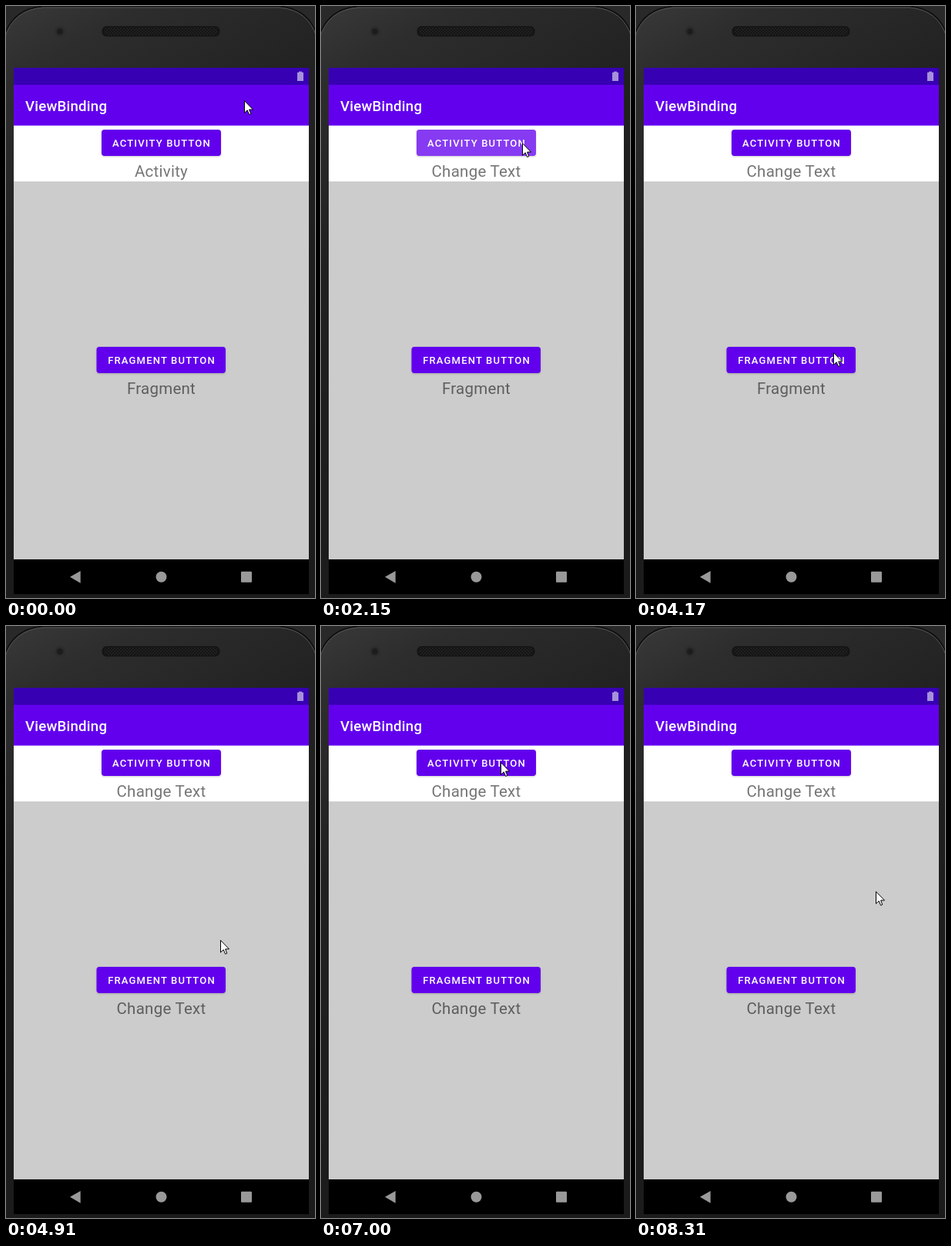
Write an HTML page that moves like this. It is 401 by 766 pixels and loops after 8.67 s.

```html
<!DOCTYPE html>
<html lang="en">
<head>
<meta charset="utf-8">
<title>ViewBinding</title>
<style>
  html, body { margin: 0; width: 100%; height: 100%; overflow: hidden; background: #161616; }
  svg { display: block; width: 401px; height: 766px; font-family: Roboto, sans-serif; }
  .title { font-size: 18.64px; font-weight: 500; letter-spacing: .0125em; fill: #fff; }
  .label { font-size: 13.05px; font-weight: 500; letter-spacing: .0893em; fill: #fff; text-anchor: middle; }
  .view { font-size: 20.5px; letter-spacing: .25px; fill: #000; fill-opacity: .54; text-anchor: middle; }
  .button { fill: #6200ee; filter: drop-shadow(0 1px 1px rgba(0, 0, 0, .2)); }
  .ripple { fill: #fff; opacity: 0; }
  .nav { fill: #999; }
</style>
</head>
<body>
<svg viewBox="0 0 401 766">
  <defs>
    <linearGradient id="body" x2=".3" y2="1">
      <stop offset="0" stop-color="#393939"/>
      <stop offset=".12" stop-color="#2d2d2d"/>
      <stop offset=".4" stop-color="#202020"/>
      <stop offset="1" stop-color="#1b1b1b"/>
    </linearGradient>
    <radialGradient id="lens">
      <stop offset=".3" stop-color="#1c1c1e"/>
      <stop offset=".6" stop-color="#2c2c2c"/>
      <stop offset="1" stop-color="#2c2c2c" stop-opacity="0"/>
    </radialGradient>
    <pattern id="mesh" width="4" height="4" patternUnits="userSpaceOnUse">
      <circle cx="1" cy="1" r=".8" fill="#303030"/>
      <circle cx="3" cy="3" r=".8" fill="#303030"/>
    </pattern>
    <clipPath id="clipA"><rect x="124" y="160" width="155" height="34" rx="3.7"/></clipPath>
    <clipPath id="clipF"><rect x="117.5" y="441" width="167.5" height="34" rx="3.7"/></clipPath>
  </defs>

  <!-- phone -->
  <rect width="401" height="60" fill="#292929"/>
  <path d="M-2 770V40Q8 4 48 .5H355Q393 4 403 38V770Z" fill="url(#body)" stroke="#101010" stroke-width="2"/>
  <path d="M-2 42Q9 5 48 2H355Q392 5 403 40" fill="none" stroke="#555"/>
  <circle cx="70" cy="33" r="9" fill="url(#lens)"/>
  <rect x="124.5" y="26" width="153" height="13.5" rx="6" fill="#141414"/>
  <rect x="127" y="27.5" width="148" height="10.5" rx="5" fill="url(#mesh)"/>

  <!-- screen -->
  <rect x="10" y="80" width="383" height="681"/>
  <rect x="10" y="80" width="383" height="22" fill="#3700b3"/>
  <path d="M380 86V84.8H384V86H386V97H378V86Z" fill="#a690dc"/>
  <rect x="10" y="154" width="383" height="73" fill="#fff"/>
  <rect x="10" y="227" width="383" height="489" fill="#ccc"/>
  <rect x="10" y="102" width="383" height="52.7" fill="#6200ee"/>
  <text class="title" x="24.9" y="135.6">ViewBinding</text>

  <rect class="button" x="124" y="160" width="155" height="34" rx="3.7"/>
  <g clip-path="url(#clipA)"><circle class="ripple" id="rippleA"/></g>
  <text class="label" x="202" y="182">ACTIVITY BUTTON</text>
  <text class="view" id="textA" x="201.5" y="221">Activity</text>

  <rect class="button" x="117.5" y="441" width="167.5" height="34" rx="3.7"/>
  <g clip-path="url(#clipF)"><circle class="ripple" id="rippleF"/></g>
  <text class="label" x="202" y="463">FRAGMENT BUTTON</text>
  <text class="view" id="textF" x="201.5" y="502">Fragment</text>

  <!-- navigation -->
  <path class="nav" d="M83 738.7L96.7 731V746.7Z"/>
  <circle class="nav" cx="201.5" cy="738.7" r="7"/>
  <rect class="nav" x="305" y="731.8" width="14" height="14" rx="1"/>

  <path id="cursor" d="M.5 .7V16.3L4.2 12.8L6.6 18.4L8.8 17.5L6.6 12H11.5Z" fill="#fff" stroke="#000" stroke-linejoin="round"/>
</svg>
<script>
const LOOP = 8670, STEP = 73.3, BOW = .06;
const $ = id => document.getElementById(id);

// Each stop: when the cursor leaves for it, when it arrives, and where it is.
const home = { x: 309, y: 122 };
const stops = [
  { leave: 70, arrive: 900, x: 304, y: 153 },
  { leave: 980, arrive: 1490, x: 261, y: 177 },
  { leave: 3150, arrive: 3670, x: 266, y: 412 },
  { leave: 3950, arrive: 4170, x: 256, y: 448 },
  { leave: 4690, arrive: 5130, x: 286, y: 379 },
  { leave: 5630, arrive: 6070, x: 276, y: 298 },
  { leave: 6780, arrive: 7150, x: 208, y: 133 },
  { leave: 7300, arrive: 8100, x: 315, y: 362 },
  { leave: 8180, arrive: 8310, x: 308, y: 337 }
];

function click(key, at, x, y, centreY) {
  const text = $('text' + key);
  return { at, x, y, centreY, text, before: text.textContent, ripple: $('ripple' + key) };
}
const clicks = [click('A', 1860, 261, 177, 177), click('F', 4390, 256, 448, 458)];

const clamp = x => Math.max(0, Math.min(1, x));
const mix = (a, b, u) => a + (b - a) * u;
const smooth = p => p * p * (3 - 2 * p);
const ticks = ms => Math.floor(ms / STEP + .1);

function cursorAt(t) {
  let from = home, pos = home;
  for (const to of stops) {
    if (t < to.leave) break;
    const count = Math.round((to.arrive - to.leave) / STEP) + 1;
    const u = smooth(clamp((ticks(t - to.leave) + 1) / count));
    const bow = BOW * Math.abs(to.y - from.y) * Math.sin(Math.PI * u);
    pos = { x: mix(from.x, to.x, u) + bow, y: mix(from.y, to.y, u) };
    from = to;
  }
  return pos;
}

function drawClick({ at, x, y, centreY, ripple, text, before }, t) {
  const age = ticks(t - at) * STEP;
  const grow = clamp((age + 40) / 225);
  const ease = 1 - (1 - grow) ** 2;
  const fade = clamp((age + 40) / 75) * clamp((500 - age) / 150);
  ripple.setAttribute('cx', mix(x, 201.5, ease));
  ripple.setAttribute('cy', mix(y, centreY, ease));
  ripple.setAttribute('r', mix(46, 90, ease));
  ripple.style.opacity = age < 0 ? 0 : .23 * fade;
  const value = age < 2 * STEP ? before : 'Change Text';
  if (text.textContent !== value) text.textContent = value;
}

function draw(now) {
  const t = now % LOOP;
  const { x, y } = cursorAt(t);
  $('cursor').setAttribute('transform', `translate(${Math.round(x)} ${Math.round(y)})`);
  clicks.forEach(c => drawClick(c, t));
}

let origin;
function tick(now) {
  origin ??= now;
  draw(now - origin);
  requestAnimationFrame(tick);
}
draw(0);
requestAnimationFrame(tick);
</script>
</body>
</html>
```
